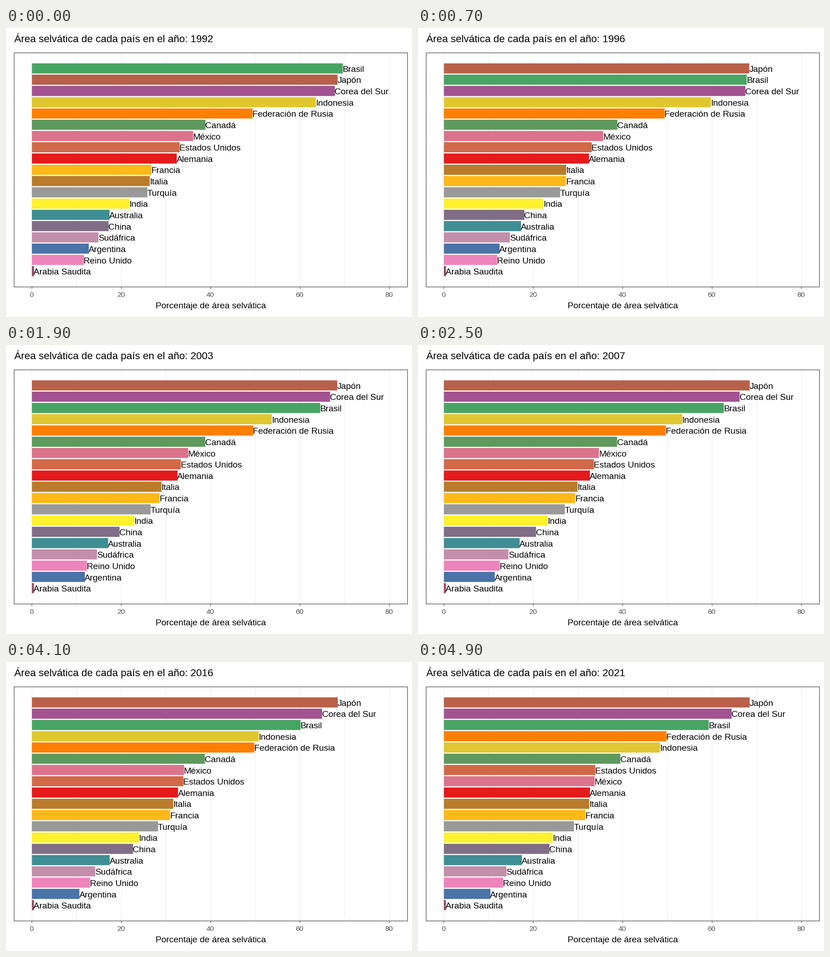
A matplotlib script that plays this animation: 885x632 px, repeating every 5 s.

```python
import numpy as np
import matplotlib.pyplot as plt
from matplotlib.animation import FuncAnimation
from matplotlib.patches import Rectangle

WIDTH, HEIGHT, DPI = 885, 632, 100
FRAMES, INTERVAL = 50, 100
FIRST_YEAR, LAST_YEAR = 1992, 2021
ZERO_X, UNIT = 56.45, 9.744          # horizontal scale in pixels
FIRST_Y, ROW = 88.4, 24.63           # vertical scale in pixels
BAR_HEIGHT = 0.9 * ROW

plt.rcParams["font.family"] = "Liberation Sans"

# Share of forest at the survey years, straight lines in between.
SURVEYS = [1992, 2000, 2010, 2015, 2021]
SHARES = {
    "Alemania": [32.41, 32.52, 32.73, 32.70, 32.68],
    "Arabia Saudita": [0.45, 0.45, 0.45, 0.45, 0.45],
    "Argentina": [12.73, 12.20, 11.03, 10.67, 10.41],
    "Australia": [17.37, 17.16, 16.87, 17.40, 17.46],
    "Brasil": [69.55, 65.93, 61.21, 60.28, 59.25],
    "Canadá": [38.84, 38.79, 38.73, 38.70, 39.48],
    "China": [17.17, 18.86, 21.37, 22.42, 23.62],
    "Corea del Sur": [67.77, 67.13, 65.75, 65.03, 64.37],
    "Estados Unidos": [33.05, 33.13, 33.75, 33.90, 33.87],
    "Federación de Rusia": [49.37, 49.41, 49.77, 49.76, 49.80],
    "Francia": [26.71, 27.92, 29.98, 30.78, 31.66],
    "India": [21.81, 22.73, 23.40, 23.87, 24.37],
    "Indonesia": [63.53, 53.94, 53.08, 50.61, 48.37],
    "Italia": [26.37, 28.33, 30.56, 31.46, 32.52],
    "Japón": [68.39, 68.25, 68.48, 68.45, 68.40],
    "México": [36.08, 35.18, 34.47, 34.13, 33.72],
    "Reino Unido": [11.63, 12.21, 12.66, 12.99, 13.26],
    "Sudáfrica": [14.89, 14.66, 14.36, 14.20, 14.02],
    "Turquía": [25.83, 26.18, 27.43, 28.05, 29.08],
}
# Years where a revised land area breaks the straight line.
REVISIONS = {
    "Canadá": {2020: 38.70},
    "Indonesia": {1999: 56.86, 2016: 50.75, 2020: 49.07},
}
SET1 = ["E41A1C", "377EB8", "4DAF4A", "984EA3", "FF7F00",
        "FFFF33", "A65628", "F781BF", "999999"]

countries = list(SHARES)
years = np.arange(FIRST_YEAR, LAST_YEAR + 1)


def yearly_shares(country):
    points = dict(zip(SURVEYS, SHARES[country]))
    points.update(REVISIONS.get(country, {}))
    knots = sorted(points)
    return np.interp(years, knots, [points[k] for k in knots])


def ramp(count):
    base = np.array([[int(c[i:i + 2], 16) for i in (0, 2, 4)] for c in SET1])
    at = np.linspace(0, len(base) - 1, count)
    channels = [np.interp(at, range(len(base)), base[:, k]) for k in range(3)]
    return np.round(np.column_stack(channels)) / 255


shares = np.array([yearly_shares(c) for c in countries])
ranks = np.argsort(np.argsort(-shares, axis=0, kind="stable"), axis=0)
key_frames = np.round((years - FIRST_YEAR) * (FRAMES - 1)
                      / (LAST_YEAR - FIRST_YEAR))

fig = plt.figure(figsize=(WIDTH / DPI, HEIGHT / DPI), dpi=DPI, facecolor="white")
ax = fig.add_axes([0, 0, 1, 1])
ax.set_xlim(0, WIDTH)
ax.set_ylim(HEIGHT, 0)
ax.axis("off")


def px(size):
    return size * 72 / DPI


def write(x, y, text, size, color="black", ha="left"):
    return ax.text(x, y, text, fontsize=px(size), color=color, ha=ha,
                   va="baseline", zorder=4)


def line(xs, ys, color, z):
    ax.plot(xs, ys, color=color, lw=px(1), zorder=z, snap=False,
            solid_capstyle="butt")


for value in range(0, 81, 10):
    x = ZERO_X + value * UNIT
    line([x, x], [54, 566], "#EBEBEB", 1)
    if value % 20 == 0:
        line([x, x], [566, 571], "#333333", 5)
        write(x - 0.8, 588, str(value), 15.4, "#4D4D4D", "center")

ax.add_patch(Rectangle((17.7, 54.4), 857.5, 511.9, fill=False, snap=False,
                       ec="#333333", lw=px(1.1), zorder=5))
write(446.4, 613, "Porcentaje de área selvática", 19.15, ha="center")
title = write(17.6, 31, "", 22.28)

bars, labels = [], []
for country, color in zip(countries, ramp(len(countries))):
    bar = Rectangle((ZERO_X, 0), 0, BAR_HEIGHT, fc=color, lw=0, zorder=2,
                    snap=False)
    bars.append(ax.add_patch(bar))
    labels.append(write(0, 0, country, 19.15))


def update(frame):
    elapsed = (LAST_YEAR - FIRST_YEAR) * frame / (FRAMES - 1)
    title.set_text(f"Área selvática de cada país en el año: "
                   f"{FIRST_YEAR + round(elapsed)}")
    for bar, label, share, rank in zip(bars, labels, shares, ranks):
        length = UNIT * np.interp(frame, key_frames, share)
        y = FIRST_Y + ROW * np.interp(frame, key_frames, rank)
        bar.set_width(length)
        bar.set_y(y - BAR_HEIGHT / 2)
        label.set_position((ZERO_X + length - 0.5, y + 7.4))
    return [title, *bars, *labels]


def reset():
    return update(0)


anim = FuncAnimation(fig, update, frames=FRAMES, init_func=reset,
                     interval=INTERVAL, repeat=True, repeat_delay=0, blit=False)
plt.show()
```
